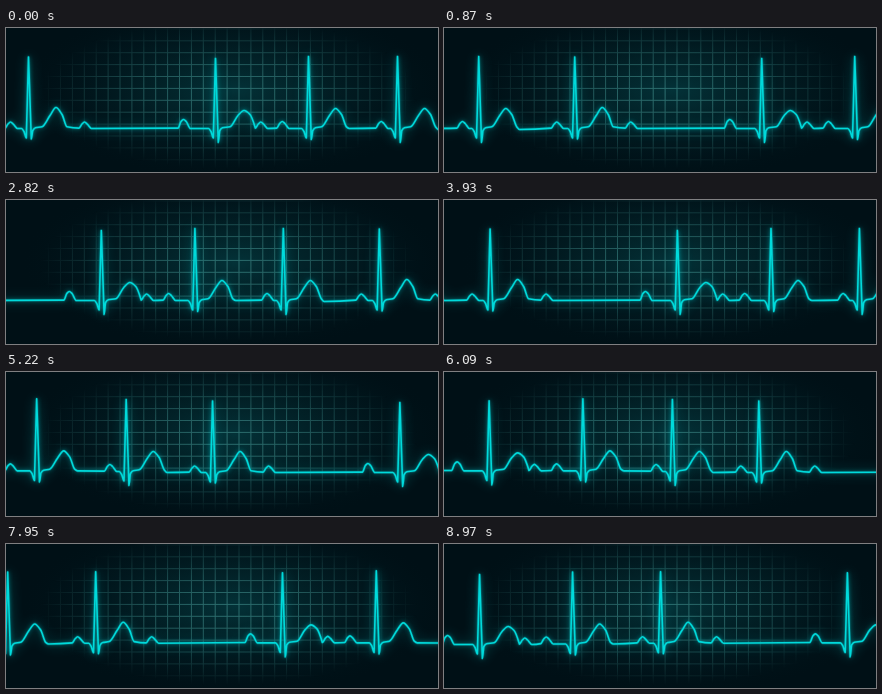
Write an HTML page with a canvas that moves like this. It is 432 by 144 pixels and loops after 9000 ms.

```html
<!DOCTYPE html>
<html lang="en">
<head>
<meta charset="utf-8">
<title>Heartbeat monitor</title>
<style>
html, body { margin: 0; width: 100%; height: 100%; overflow: hidden; background: #001016; }
canvas { display: block; width: 432px; height: 144px; }
</style>
</head>
<body>
<canvas id="stage" width="432" height="144"></canvas>
<script>
const W = 432, H = 144, LOOP = 9000, STEP = 30, SPEED = 0.1244, BASE = 100;
const ctx = document.getElementById('stage').getContext('2d');

// Offsets from the spike: p, t and u are wave centres; r and s are spike heights.
const KINDS = {
  A: { p: -32, pTop: 91, r: 30, s: 114, t: 28.5, tTop: 82, u: 45.3 },
  B: { p: -26.3, pTop: 93, r: 28, s: 111, t: 27, tTop: 80, end: 100 },
  C: { p: -16.3, pTop: 93, r: 28, s: 114, t: 27, tTop: 80, end: 101 },
  D: { p: -18, pTop: 93.5, r: 28.5, s: 110.5, t: 27.5, tTop: 79, u: 56 }
};

// kind, position along the strip, vertical shift
const BEATS = [
  ['A', -1080.8, 0], ['B', -987.8, -0.5], ['D', -899.8, -1.2],
  ['A', -713, -1.6], ['B', -619.2, -1.6], ['C', -529.7, -1], ['D', -443.3, 0],
  ['A', -256, 0], ['B', -162.4, 0], ['C', -74, 0], ['D', 22, 0],
  ['A', 209, 0], ['B', 302, 0], ['C', 391, 0]
];

function bump(x, top) {
  return [[x - 5.5, BASE - 0.4], [x - 2.5, top + 2], [x, top], [x + 2.7, top + 2], [x + 7, BASE]];
}

function beat([kind, x, shift]) {
  const k = KINDS[kind], t = k.t;
  const points = [
    ...bump(k.p, k.pTop),
    [-7, BASE], [-4.5, 103], [-2.2, 109.5], [0, k.r], [2.8, k.s], [4.3, 102], [7, 99.3],
    [t - 14, 98.3], [t - 6, 87], [t, k.tTop], [t + 6, 86], [t + 11, 98.3],
    ...(k.u ? bump(k.u, 93.5) : [[t + 14, k.end]])
  ];
  return points.map(([dx, y]) => [x + dx, y + shift]);
}

const trace = [[-1150, BASE], ...BEATS.flatMap(beat), [470, BASE]];
const slope = (a, b) => (b[1] - a[1]) / (b[0] - a[0]);

// Harmonic-mean slopes keep the curve from overshooting.
const slopes = trace.map((p, i) => {
  if (!i || i === trace.length - 1) return 0;
  const a = slope(trace[i - 1], p), b = slope(p, trace[i + 1]);
  return a * b > 0 ? 2 * a * b / (a + b) : 0;
});

const path = new Path2D();
path.moveTo(...trace[0]);
for (let i = 1; i < trace.length; i++) {
  const a = trace[i - 1], b = trace[i], d = (b[0] - a[0]) / 3;
  if (Math.abs(b[1] - a[1]) > 12.5) path.lineTo(...b);
  else path.bezierCurveTo(a[0] + d, a[1] + slopes[i - 1] * d, b[0] - d, b[1] - slopes[i] * d, ...b);
}

function layer() {
  const c = document.createElement('canvas');
  c.width = W;
  c.height = H;
  return c;
}

function oval(g, x, y, rx, ry, stops) {
  g.save();
  g.translate(x, y);
  g.scale(rx, ry);
  const fill = g.createRadialGradient(0, 0, 0, 0, 0, 1);
  stops.forEach(([at, color]) => fill.addColorStop(at, color));
  g.fillStyle = fill;
  g.fillRect(-x / rx, -y / ry, W / rx, H / ry);
  g.restore();
}

function makeGrid() {
  const c = layer(), g = c.getContext('2d'), gap = 11.9;
  g.fillStyle = '#3f8a88';
  for (let x = 6.4; x < W; x += gap) g.fillRect(x, 0, 1, H);
  for (let y = 0.4; y < H; y += gap) g.fillRect(0, y, W, 1);
  g.globalCompositeOperation = 'destination-in';
  oval(g, 222, 66, 190, 76, [
    [0, 'rgba(0,0,0,.72)'], [0.45, 'rgba(0,0,0,.5)'], [0.8, 'rgba(0,0,0,.2)'], [1, 'rgba(0,0,0,0)']
  ]);
  return c;
}

function makeBackdrop() {
  const c = layer(), g = c.getContext('2d');
  g.fillStyle = '#001016';
  g.fillRect(0, 0, W, H);
  oval(g, 228, 62, 215, 90, [
    [0, 'rgba(4,58,64,.8)'], [0.4, 'rgba(3,42,48,.6)'], [0.75, 'rgba(1,26,33,.35)'], [1, 'rgba(0,16,22,0)']
  ]);
  g.drawImage(makeGrid(), 0, 0);
  return c;
}

const backdrop = makeBackdrop();

function stroke(color, width, blur, glow) {
  ctx.strokeStyle = color;
  ctx.lineWidth = width;
  ctx.shadowBlur = blur;
  ctx.shadowColor = glow;
  ctx.stroke(path);
}

function draw(time) {
  ctx.drawImage(backdrop, 0, 0);
  ctx.save();
  // Centre the line on whole pixels.
  ctx.translate(time * SPEED + 0.5, 0.5);
  ctx.lineJoin = ctx.lineCap = 'round';
  stroke('rgba(0,150,155,.3)', 3, 13, 'rgba(0,215,220,1)');
  stroke('#00dadb', 1.6, 4, 'rgba(0,200,205,.65)');
  ctx.restore();
}

const start = performance.now();
function tick() {
  const time = (performance.now() - start) % LOOP;
  draw(Math.floor(time / STEP) * STEP);
  requestAnimationFrame(tick);
}
tick();
</script>
</body>
</html>
```
